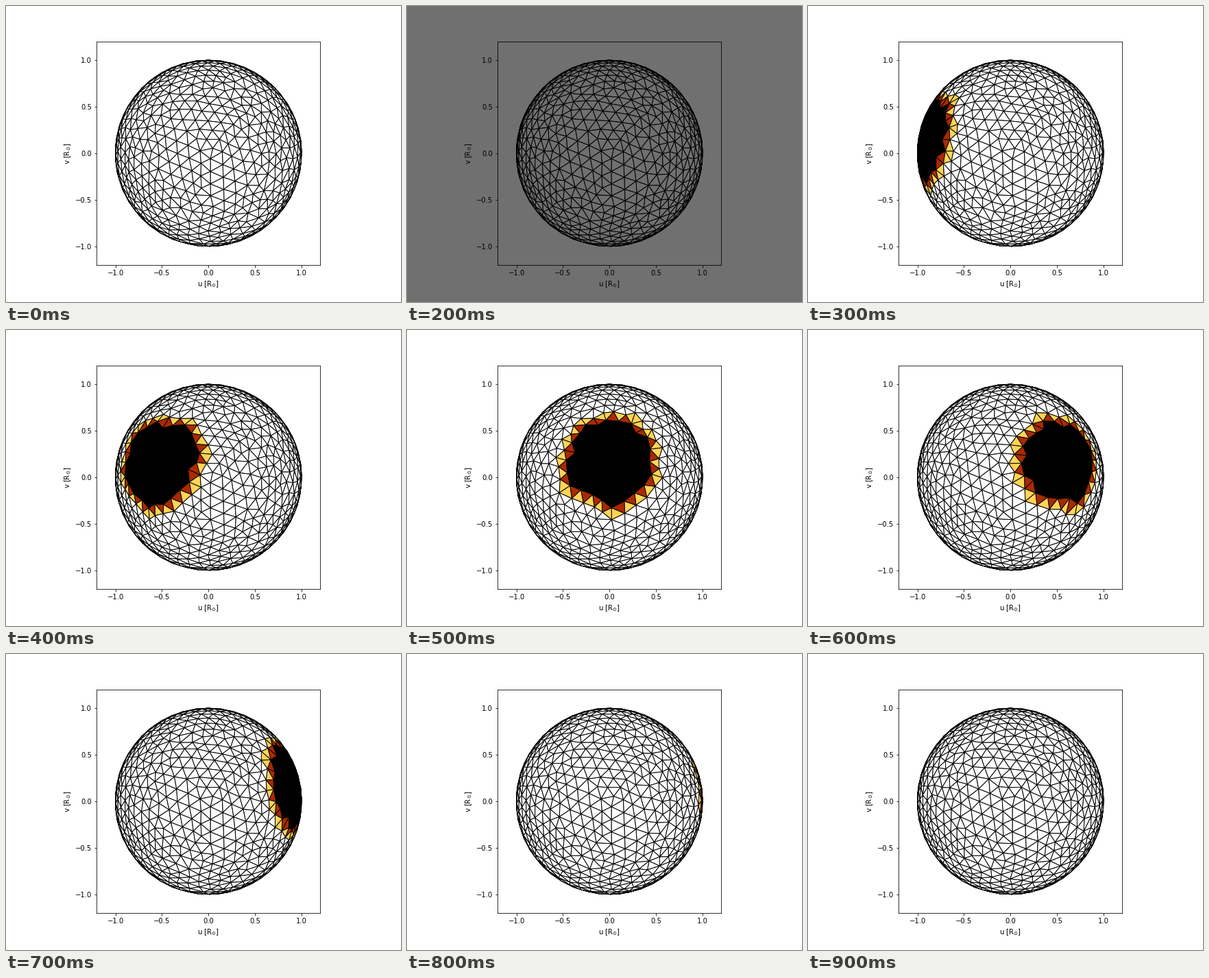
A matplotlib script that plays this animation: 576x432 px, repeating every 1.1 s.

```python
import math

import numpy as np
import matplotlib.pyplot as plt
from matplotlib.animation import FuncAnimation
from matplotlib.collections import PolyCollection

W, H, DPI = 576, 432, 72
STEPS = 11
DIM_STEP = 2
DIM = 112 / 255
N_TRIANGLES = 1500
RADIUS = 1.0016  # flat faces then keep the area of the unit sphere
SPOT_COLAT, SPOT_RADIUS = math.radians(80), math.radians(30)


def unit(p):
    return p / np.linalg.norm(p)


def tangents(n):
    if max(abs(n[0]), abs(n[1])) > 0.5:
        t1 = unit(np.array([n[1], -n[0], 0.0]))
    else:
        t1 = unit(np.array([-n[2], 0.0, n[0]]))
    return t1, np.cross(n, t1)


def step_from(p, angle, delta):
    """Point on the unit sphere about delta away from p in a tangent direction."""
    t1, t2 = tangents(p)
    return unit(p + delta * (math.cos(angle) * t1 + math.sin(angle) * t2))


def bearing(p, q):
    t1, t2 = tangents(p)
    return math.atan2((q - p) @ t2, (q - p) @ t1)


def marching_sphere(delta):
    """Marching triangulation of the unit sphere, grown from the north pole."""
    pole = np.array([0.0, 0.0, 1.0])
    pts = [pole] + [step_from(pole, k * math.pi / 3, delta) for k in range(6)]
    tris = [(0, k + 1, (k + 1) % 6 + 1) for k in range(6)]
    front = list(range(1, 7))
    cache = {}

    def dist(a, b):
        return np.linalg.norm(pts[a] - pts[b])

    def opening(i):
        key = front[i - 1], front[i], front[(i + 1) % len(front)]
        if key not in cache:
            a, v, b = (pts[k] for k in key)
            gap = (bearing(v, b) - bearing(v, a)) % (2 * math.pi)
            cache[key] = round(gap, 9)
        return cache[key]

    while len(front) > 3 and len(tris) < 2 * N_TRIANGLES:
        i = min(range(len(front)), key=opening)
        omega = opening(i)
        a, v, b = front[i - 1], front[i], front[(i + 1) % len(front)]
        count = int(omega * 3 / math.pi) + 1
        if omega / count < 0.8 and count > 1:
            count -= 1
        elif count == 1 and omega > 0.8 and dist(a, b) > 1.2 * delta:
            count = 2
        elif omega < 3 and min(dist(a, v), dist(b, v)) <= 0.5 * delta:
            count = 1
        # close the last hole without new points
        if len(front) < 10 and pts[v][2] < 0:
            count = 1
        start = bearing(pts[v], pts[a])
        first = len(pts)
        for k in range(1, count):
            pts.append(step_from(pts[v], start + k * omega / count, delta))
        new = list(range(first, len(pts)))
        fan = [a] + new + [b]
        tris += [(v, p, q) for p, q in zip(fan, fan[1:])]
        front[i:i + 1] = new
    tris.append(tuple(reversed(front[:3])))
    return np.array(pts), np.array(tris)


delta = math.sqrt(4 / math.sqrt(3) * 4 * math.pi / N_TRIANGLES)
points, triangles = marching_sphere(delta)
# view along the equator: u right, v up, w towards the viewer
view = points[:, [0, 2, 1]] * [1, 1, -1]
triangles = triangles[np.argsort(view[triangles, 2].mean(axis=1))]


def face_colors(step):
    lon = 2 * math.pi * (step / (STEPS - 1) - 0.5)
    ring = math.sin(SPOT_COLAT)
    center = np.array([ring * math.sin(lon), math.cos(SPOT_COLAT),
                       ring * math.cos(lon)])
    warm = view @ center < math.cos(SPOT_RADIUS)
    colors = plt.get_cmap("afmhot")(warm[triangles].mean(axis=1))
    if step == DIM_STEP:
        luma = colors[:, :3] @ [0.299, 0.587, 0.114]
        colors[:, :3] = DIM * luma[:, None]
    return colors


fig = plt.figure(figsize=(W / DPI, H / DPI), dpi=DPI)
side = 0.755 * H / W
ax = fig.add_axes([0.5125 - side / 2, 0.125, side, 0.755])
limits = -1.2 * RADIUS, 1.2 * RADIUS
ax.set(xlim=limits, ylim=limits,
       xlabel=r"u [$\mathrm{R_{\odot}}$]", ylabel=r"v [$\mathrm{R_{\odot}}$]")
ticks = np.arange(-1, 1.1, 0.5)
ax.set_xticks(ticks)
ax.set_yticks(ticks)
mesh = PolyCollection(RADIUS * view[triangles][:, :, :2],
                      edgecolors="black", linewidths=1)
ax.add_collection(mesh, autolim=False)


def update(step):
    paper = str(DIM) if step == DIM_STEP else "white"
    fig.set_facecolor(paper)
    ax.set_facecolor(paper)
    mesh.set_facecolor(face_colors(step))
    return (mesh,)


anim = FuncAnimation(fig, update, frames=STEPS, interval=100,
                     repeat=True, repeat_delay=0, blit=False)
plt.show()
```
